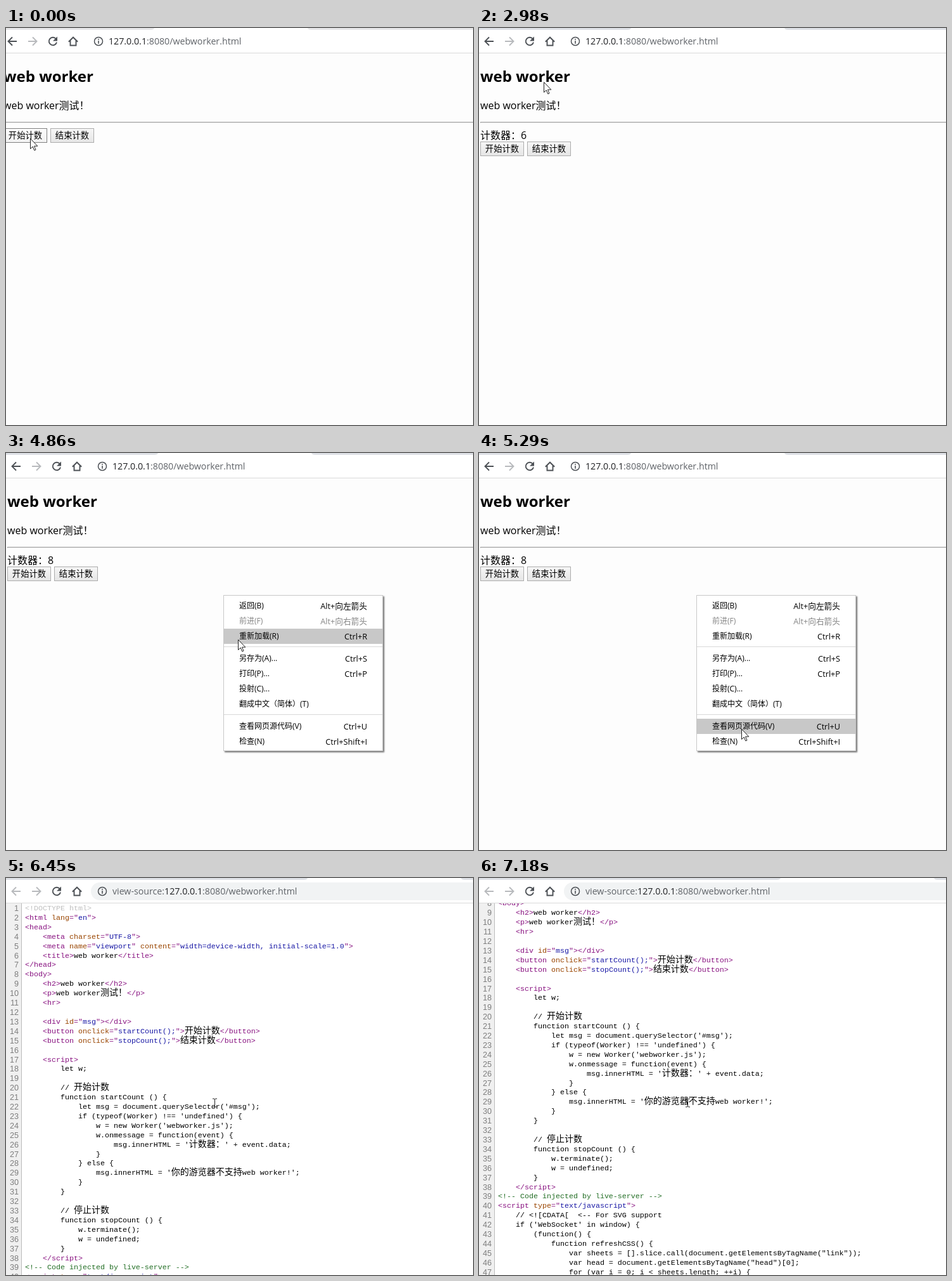
Write an HTML page that moves like this. It is 737 px wide and 626 px high and loops after 8000 ms.

```html
<!DOCTYPE html>
<html lang="zh-CN">
<head>
<meta charset="UTF-8">
<style>
html, body { margin: 0; width: 100%; height: 100%; overflow: hidden; background: #fdfdfd; }
body, #win { position: relative; }
body { font-family: "Open Sans", "Noto Sans CJK SC", "Noto Sans CJK", sans-serif; color: #000; }
#win { width: 743px; height: 626px; }
#win div, #win svg, h2, p, hr, #cursor { position: absolute; margin: 0; white-space: pre; }
#win svg, #page, #bar, #view, #gutter, #code { left: 0; top: 0; }
#bar { width: 743px; height: 39px; background: #fff; border-bottom: 1px solid #dadada; }
#pill { left: 134px; top: 7px; width: 640px; height: 28px; border-radius: 14px; background: #f1f3f4; }
#url { left: 168px; top: 10.5px; font-size: 14.2px; line-height: 20px; color: #5f6368; }
#url b { font-weight: 400; color: #202124; }
h2 { left: 2px; top: 60px; font-size: 24px; line-height: 32px; }
p { left: 2px; top: 112px; font-size: 16px; line-height: 20px; }
hr { left: 2px; top: 148px; width: 760px; height: 0; border: 1px solid; border-color: #9a9a9a #eee #eee #9a9a9a; }
#msg { left: 2px; top: 159px; font-size: 16px; line-height: 20px; }
.btn { box-sizing: border-box; width: 69px; height: 23px; border: 1px solid #acacac; font-size: 13.333px;
  line-height: 21px; text-align: center; background: linear-gradient(#f6f6f6, #e6e6e6); }
.btn.hover { border-color: #808080; background: linear-gradient(#fdfdfd, #f2f2f2); }
.btn.down { border-color: #707070; background: #e2e2e2; }
#menu { left: 343px; top: 224px; width: 250px; height: 244px; border: 1px solid #c8c8c8; background: #fff;
  box-shadow: 2px 2px 2px #777; font-size: 12px; line-height: 24px; }
#menu div { left: 0; width: 250px; height: 24px; text-indent: 24px; }
#menu i { position: absolute; right: 24px; font-style: normal; font-size: 12.7px; text-indent: 0; }
#menu .off { color: #858585; }
#menu .hover { background: #c8c8c8; }
#menu .sep { height: 1px; background: #d8d8d8; }
#view { top: 40px; width: 743px; height: 586px; overflow: hidden; background: #fff; }
#gutter { width: 24px; height: 586px; background: #f0f0f0; border-right: 1px solid #bbb; }
#code { font: 11.667px/14.92px "Liberation Mono", "Noto Sans CJK SC", monospace; }
#code div { position: relative; height: 14.92px; padding-left: 30px; }
#code i { position: absolute; left: 0; width: 20px; text-align: right; color: #7d7d7d;
  font: 12.6px/14.92px "Liberation Sans", sans-serif; }
#code u { font-size: 14px; font-weight: 300; line-height: 0; text-decoration: none; }
.tag { color: #881280; } .name { color: #994500; } .value { color: #1a1aa6; }
.note { color: #236e25; } .doctype { color: #c0c0c0; }
#cursor { left: 0; top: 0; overflow: visible; }
</style>
</head>
<body>
<div id="win">
  <div id="page">
    <h2>web worker</h2>
    <p>web worker测试！</p>
    <hr>
    <div id="msg"></div>
    <div class="btn" id="start" style="left:2px">开始计数</div>
    <div class="btn" id="stop" style="left:76px">结束计数</div>
    <div id="menu"></div>
  </div>
  <div id="view"><div id="gutter"></div><div id="code"></div></div>
  <div id="bar">
    <div id="pill"></div>
    <svg width="743" height="40" fill="none" stroke="#4d5156" stroke-width="1.9">
      <path id="tabs" stroke="none" d="M-300 0H240Q239 3 234 3H-300ZM482 0Q483 3 488 3H760V0Z"/>
      <path id="back" d="M23 21H10M16 14.5L9.5 21l6.5 6.5"/>
      <path stroke="#b8babd" d="M41 21H54M48 14.5L54.5 21l-6.5 6.5"/>
      <path d="M84.8 17A6.2 6.2 0 1 0 86 22.5"/>
      <path fill="#4d5156" stroke="none" d="M87 13.5v7h-7z"/>
      <path d="M104.8 21.8L112 14.7l7.2 7.1M107.5 20v7.5h9V20"/>
      <circle cx="152" cy="21" r="6.5" stroke-width="1.5"/>
      <path stroke-width="1.6" d="M152 20v4.7M152 17v1.7"/>
    </svg>
    <div id="url"><span id="scheme">view-source:</span><b>127.0.0.1</b>:8080/webworker.html</div>
  </div>
</div>
<svg id="cursor" width="1" height="1">
  <path id="arrow" fill="#fff" stroke="#222" d="M.5 .5V16.5L4.2 13l2.6 6 2.2-1-2.5-5.8H11.8Z"/>
  <path id="beam" fill="none" stroke="#222" transform="translate(.5 .5)"
    d="M-3.5-6.5h2.5l1 1 1-1h2.5M0-5.5v11M-3.5 6.5h2.5l1-1 1 1h2.5"/>
</svg>
<script>
const LOOP = 8000, MENU_OPEN = 4720, SOURCE_OPEN = 5440, BEAM = 5590;

const source = `<!DOCTYPE html>
<html lang="en">
<head>
    <meta charset="UTF-8">
    <meta name="viewport" content="width=device-width, initial-scale=1.0">
    <title>web worker</title>
</head>
<body>
    <h2>web worker</h2>
    <p>web worker测试！</p>
    <hr>

    <div id="msg"></div>
    <button onclick="startCount();">开始计数</button>
    <button onclick="stopCount();">结束计数</button>

    <\script>
        let w;

        // 开始计数
        function startCount () {
            let msg = document.querySelector('#msg');
            if (typeof(Worker) !== 'undefined') {
                w = new Worker('webworker.js');
                w.onmessage = function(event) {
                    msg.innerHTML = '计数器：' + event.data;
                }
            } else {
                msg.innerHTML = '你的游览器不支持web worker!';
            }
        }

        // 停止计数
        function stopCount () {
            w.terminate();
            w = undefined;
        }
    <\/script>
<\!-- Code injected by live-server -->
<\script type="text/javascript">
    // <\![CDATA[  <-- For SVG support
    if ('WebSocket' in window) {
        (function() {
            function refreshCSS() {
                var sheets = [].slice.call(document.getElementsByTagName("link"));
                var head = document.getElementsByTagName("head")[0];
                for (var i = 0; i < sheets.length; ++i) {`;

const $ = id => document.getElementById(id);
const esc = s => s.replace(/</g, '&lt;').replace(/[\u3000-\u9fff\uff00-\uffef]+/g, '<u>$&</u>');
const span = (cls, html) => `<span class="${cls}">${html}</span>`;

function paint(token) {
  if (token.startsWith('<\!--')) return span('note', esc(token));
  if (token.startsWith('<!D')) return span('doctype', esc(token));
  return span('tag', esc(token).replace(/([\w-]+)="([^"]*)"/g,
    (m, name, value) => `${span('name', name)}="${span('value', value)}"`));
}

function highlight(line) {
  return line.split(/(<!--.*-->|<!D.*?>|<\/?[a-z][^>]*>)/)
    .map((part, i) => i % 2 ? paint(part) : esc(part)).join('');
}

$('code').innerHTML = source.split('\n')
  .map((line, i) => `<div><i>${i + 1}</i>${highlight(line)}</div>`).join('');

// Menu rows: label, shortcut; null is a separator.
const rows = [['返回(B)', 'Alt+向左箭头'], ['前进(F)', 'Alt+向右箭头'], ['重新加载(R)', 'Ctrl+R'], null,
  ['另存为(A)...', 'Ctrl+S'], ['打印(P)...', 'Ctrl+P'], ['投射(C)...', ''], ['翻成中文（简体）(T)', ''], null,
  ['查看网页源代码(V)', 'Ctrl+U'], ['检查(N)', 'Ctrl+Shift+I']];
const items = [];
let rowTop = 4;
for (const row of rows) {
  const el = $('menu').appendChild(document.createElement('div'));
  if (row) {
    el.innerHTML = `${row[0]}<i>${row[1]}</i>`;
    el.style.top = rowTop + 'px';
    items.push({ el, top: rowTop + 225 });
    rowTop += 24;
  } else {
    el.className = 'sep';
    el.style.top = rowTop + 4 + 'px';
    rowTop += 11;
  }
}
items[1].el.classList.add('off');

const counts = [[0, 0], [260, 1], [690, 2], [1270, 3], [2000, 4], [2250, 5], [2690, 6], [3270, 7], [3710, 8]];
const scrolls = [[0, 0], [6750, 40], [6880, 100], [7030, 110], [7180, 112]];
// Pointer moves: first step, last step, number of steps, from x y, to x y.
const moves = [
  [0, 1, 1, 38, 174, 38, 174],
  [690, 1270, 5, 38, 174, 95, -18],
  [2550, 3560, 8, 95, -18, 110, 188],
  [4000, 4130, 2, 110, 188, 202, 207],
  [4270, 4420, 2, 202, 207, 343, 224],
  [4860, 5140, 3, 343, 224, 414, 435],
  [BEAM, BEAM + 1, 1, 422, 447, 422, 447],
  [5870, 6450, 5, 422, 447, 329.5, 354]
];

const latest = (keys, t) => keys.filter(k => k[0] <= t).pop();

function pointer(t) {
  const [t0, t1, n, x0, y0, x1, y1] = latest(moves, t);
  const k = Math.min(n, 1 + Math.floor((t - t0 + 15) / (t1 - t0) * (n - 1))) / n;
  return [x0 + (x1 - x0) * k, y0 + (y1 - y0) * k];
}

const show = (id, on) => { $(id).style.display = on ? '' : 'none'; };

function draw(t) {
  const count = latest(counts, t)[1], inSource = t >= SOURCE_OPEN, shifted = t < 2120;
  const [x, y] = pointer(t);

  $('win').style.left = shifted ? '-6px' : 0;
  $('tabs').setAttribute('fill', shifted ? '#e6e6e8' : '#dee1e6');
  $('tabs').setAttribute('transform', `translate(${inSource ? 236 : 0})`);
  $('back').setAttribute('stroke', inSource ? '#b8babd' : '#4d5156');
  for (const id of ['view', 'pill', 'scheme']) show(id, inSource);
  show('page', !inSource);

  $('msg').textContent = count ? '计数器：' + count : '';
  const top = count ? 179 : 158;
  for (const id of ['start', 'stop']) {
    const b = $(id), dx = x - b.offsetLeft + (shifted ? 6 : 0);
    b.style.top = top + 'px';
    b.classList.toggle('hover', dx >= 0 && dx < 69 && y >= top && y < top + 23);
  }
  $('start').classList.toggle('down', t >= 130 && t < 260);

  show('menu', t >= MENU_OPEN);
  for (const { el, top } of items) el.classList.toggle('hover', y >= top && y < top + 24);

  $('code').style.top = 1 - latest(scrolls, t)[1] + 'px';
  $('cursor').style.transform = `translate(${Math.floor(x)}px, ${Math.round(y)}px)`;
  show('arrow', t < BEAM);
  show('beam', t >= BEAM);
}

const begin = performance.now();
function tick() {
  draw((performance.now() - begin) % LOOP);
  requestAnimationFrame(tick);
}
tick();
</script>
</body>
</html>
```
